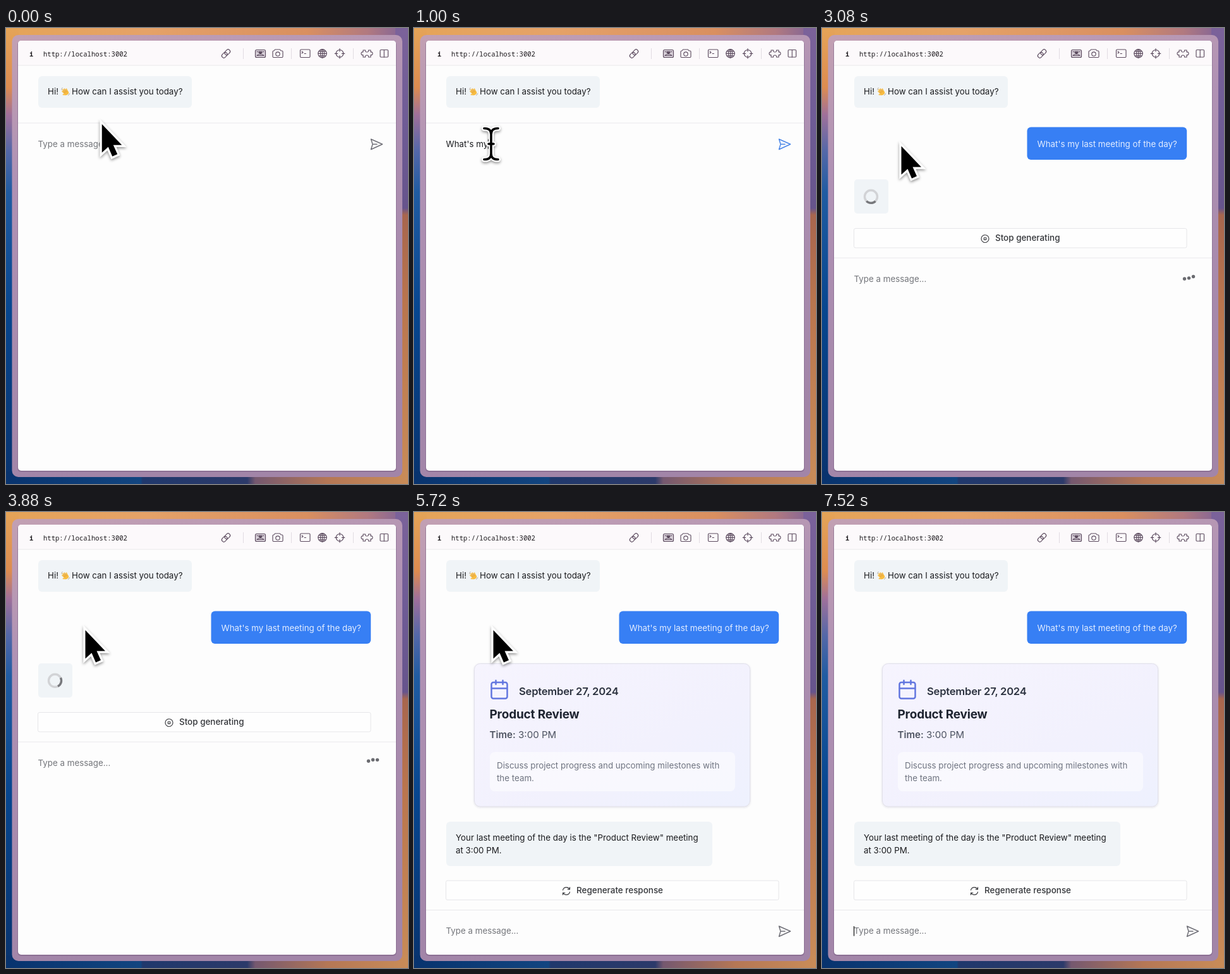
An HTML page that plays this animation: 636x720 px, repeating every 7.56 s.

```html
<!DOCTYPE html>
<html lang="en">
<head>
<meta charset="utf-8">
<title>Chat assistant</title>
<style>
  html, body { margin: 0; width: 100%; height: 100%; overflow: hidden; background: #14427e; }
  svg { display: block; width: 636px; height: 720px; }
  text { font: 400 13.35px Inter, Roboto, sans-serif; fill: #1b1c1f; white-space: pre; }
  .mono { font: 500 10.55px "Noto Sans Mono", "DejaVu Sans Mono", monospace; fill: #1d1a1e; }
  .mid { font-size: 13.45px; font-weight: 500; fill: #333539; }
  .hint { fill: #74767b; }
  .bot { fill: #f0f4f7; }
  .mine { fill: #e3edff; }
  .date { font-size: 16.6px; font-weight: 600; letter-spacing: -.014em; fill: #2d3340; }
  .title { font-size: 19px; font-weight: 700; letter-spacing: -.01em; fill: #1f2530; }
  .time { font-size: 15.1px; fill: #4d5360; }
  .note { fill: #6f7480; }
  .icon { fill: none; stroke: #5d4c60; stroke-width: 1.15; stroke-linecap: round; stroke-linejoin: round; }
  .dark { stroke: #3a3b3f; }
  .rule { stroke: #e9e8eb; }
  .cursor { filter: drop-shadow(0 2px 2px rgba(0,0,0,.42)); }
</style>
</head>
<body>
<svg viewBox="0 0 636 720">
  <defs>
    <linearGradient id="left" x2="0" y2="1">
      <stop offset="0" stop-color="#e5a458"/><stop offset=".13" stop-color="#dd8c50"/>
      <stop offset=".19" stop-color="#a0709a"/><stop offset=".27" stop-color="#5468a8"/>
      <stop offset=".36" stop-color="#205ca2"/><stop offset=".62" stop-color="#07468f"/>
      <stop offset="1" stop-color="#08336e"/>
    </linearGradient>
    <linearGradient id="top">
      <stop offset="0" stop-color="#e5a458"/><stop offset=".35" stop-color="#e5a268"/>
      <stop offset=".75" stop-color="#d98f60"/><stop offset=".9" stop-color="#b17980"/>
      <stop offset="1" stop-color="#7b629a"/>
    </linearGradient>
    <linearGradient id="right" x2="0" y2="1">
      <stop offset="0" stop-color="#7b629a"/><stop offset=".2" stop-color="#6f5c96"/>
      <stop offset=".395" stop-color="#66548c"/><stop offset=".41" stop-color="#a8664e"/>
      <stop offset=".6" stop-color="#b9754e"/><stop offset="1" stop-color="#c98c58"/>
    </linearGradient>
    <linearGradient id="base">
      <stop offset="0" stop-color="#08336e"/><stop offset=".335" stop-color="#124580"/>
      <stop offset=".34" stop-color="#20386c"/><stop offset=".6" stop-color="#2c3a6a"/>
      <stop offset=".62" stop-color="#75586f"/><stop offset=".8" stop-color="#b57755"/>
      <stop offset="1" stop-color="#c98c58"/>
    </linearGradient>
    <linearGradient id="frame" x2=".2" y2="1">
      <stop offset="0" stop-color="#c2a0b3"/><stop offset=".3" stop-color="#b092b4"/>
      <stop offset="1" stop-color="#a285a8"/>
    </linearGradient>
    <linearGradient id="card" x2="1" y2="1">
      <stop offset="0" stop-color="#f6f4fe"/><stop offset=".6" stop-color="#f2f1fd"/>
      <stop offset="1" stop-color="#eef1fe"/>
    </linearGradient>
    <filter id="soft" x="-10%" y="-10%" width="120%" height="120%">
      <feDropShadow dx="0" dy="1" stdDeviation="1.5" flood-color="#40406a" flood-opacity=".16"/>
    </filter>
    <path id="beamShape" d="M-11 -24.5Q0 -25 0 -15Q0 -25 11 -24.5M0 -15V15M-11 24.5Q0 25 0 15Q0 25 11 24.5M-4 0H4"/>
  </defs>

  <!-- desktop and window -->
  <rect width="636" height="720" fill="url(#top)"/>
  <rect width="20" height="720" fill="url(#left)"/>
  <rect x="616" width="20" height="720" fill="url(#right)"/>
  <rect y="700" width="636" height="20" fill="url(#base)"/>
  <rect x="9.5" y="11" width="617.5" height="698" rx="10" fill="url(#frame)"/>
  <rect x="18" y="20" width="600" height="681" rx="6" fill="#7d6388" opacity=".6"/>
  <rect x="19" y="20" width="598" height="679" rx="5" fill="#fdfdfd"/>
  <path d="M19 59V25a5 5 0 0 1 5-5H612a5 5 0 0 1 5 5V59z" fill="#fcf9fb"/>
  <path class="rule" d="M19 59H617"/>

  <!-- toolbar -->
  <text class="mono" x="37" y="44.5" style="font-weight:700">i</text>
  <text class="mono" x="59" y="44.5">http://localhost:3002</text>
  <path d="M375.5 32V49M451.5 32V49M549.5 32V49" stroke="#e2dce2"/>
  <g class="icon">
    <g transform="rotate(-45 348 40.5)">
      <rect x="340" y="37.3" width="9.5" height="6.4" rx="3.2"/>
      <rect x="346.5" y="37.3" width="9.5" height="6.4" rx="3.2"/>
    </g>
    <rect x="394.5" y="34.5" width="16" height="12" rx="2" fill="#d8d0d9"/>
    <path d="M397 37.5h2M406 37.5h2M397 43.5q5.5-5 11 0z"/>
    <path d="M402.5 41l-2.5-2.5q0-2 2.5-1 2.5-1 2.5 1z" fill="#5d4c60"/>
    <path d="M424 36l1.5-2h8l1.5 2h1.5q1.5 0 1.5 1.5v7.5q0 1.5-1.5 1.5h-13q-1.5 0-1.5-1.5v-7.5q0-1.5 1.5-1.5z"/>
    <circle cx="430" cy="41" r="3.2"/>
    <rect x="465.5" y="34" width="15.5" height="12.5" rx="1.5"/>
    <path d="M468 37l2 1.5-2 1.5M472 40.5h2.5"/>
    <circle cx="500.5" cy="40.3" r="6.7"/>
    <ellipse cx="500.5" cy="40.3" rx="3" ry="6.7"/>
    <path d="M493.8 40.3h13.4M500.5 33.6v13.4M495 36.8h11M495 43.8h11"/>
    <circle cx="528" cy="40.3" r="5.8"/>
    <path d="M528 32.5v4.5M528 43.5v4.5M520.2 40.3h4.5M531.3 40.3h4.5"/>
    <path d="M565 35h3.5q-.5 3 2.5 3t2.5-3h3.5v3q3-.5 3 2.3t-3 2.3v3.4h-3.5q.5-3-2.5-3t-2.5 3h-3.5v-3.4q-3 .5-3-2.3t3-2.3z"/>
    <rect x="592" y="34.5" width="12.5" height="11.5" rx="1.2"/>
    <path d="M598.2 34.5v11.5"/>
  </g>

  <!-- greeting -->
  <rect class="bot" x="51" y="76" width="243" height="50" rx="6"/>
  <text x="66" y="105.4">Hi!</text>
  <g transform="translate(94.5 101.5) rotate(-38)" stroke="#f8bd42" stroke-width="1.8" stroke-linecap="round" fill="#f8bd42">
    <rect x="-2.6" y="-1" width="5.6" height="4.6" rx="2"/>
    <path d="M-2.8 0L-3.3 -4.5M-.9 0V-6M1.2 0L1.6 -5.5M3 1L4 -3.5M-2.6 3L-5.4 .5"/>
    <path d="M-1.8 0V-4M.3 0V-4.5M2.2 0V-4" stroke="#d08a30" stroke-width=".6"/>
  </g>
  <path d="M88 98q-.5-2.500 1.500-4M100.500 103q0 2.500-2.500 3.500" fill="none" stroke="#a99d8d" stroke-width=".8"/>
  <text x="104" y="105.4">How can I assist you today?</text>

  <!-- conversation -->
  <g id="question">
    <rect x="324.5" y="156.6" width="252.7" height="51.4" rx="6" fill="#377ff4"/>
    <text class="mine" x="340.5" y="187.5">What's my last meeting of the day?</text>
  </g>
  <g id="loading">
    <rect class="bot" x="51" y="239" width="54" height="54" rx="5"/>
    <g fill="none" stroke-width="3.4">
      <circle cx="77.5" cy="266.3" r="10" stroke="#d2d3d6"/>
      <path id="arc" d="M70.4 273.4A10 10 0 0 0 84.6 273.4" stroke="#77787c"/>
    </g>
  </g>
  <g id="skeleton">
    <rect x="97" y="240" width="439" height="219" rx="8" fill="#f8f8fe" filter="url(#soft)"/>
    <rect x="113" y="363" width="408" height="78" rx="4" fill="#fcfcfe"/>
    <g id="bars" fill="#d9e2fa">
      <circle cx="126.5" cy="270" r="16"/>
      <rect x="158" y="263" width="135" height="15" rx="3"/>
      <rect x="111" y="302" width="304" height="23" rx="3"/>
      <rect x="111" y="337" width="203" height="15" rx="3"/>
    </g>
  </g>
  <g id="meeting">
    <rect x="95.5" y="239.5" width="436" height="225.5" rx="9" fill="url(#card)" stroke="#e1e0ea" filter="url(#soft)"/>
    <g fill="none" stroke="#6276df" stroke-width="2.5" stroke-linecap="round">
      <rect x="122.5" y="269" width="25" height="25.5" rx="3"/>
      <path d="M123 278.5h24M129.5 266v6M140.5 266v6"/>
    </g>
    <text class="date" x="166" y="289">September 27, 2024</text>
    <text class="title" x="119.5" y="325.5">Product Review</text>
    <text class="time" x="119.5" y="357"><tspan font-weight="600">Time:</tspan> 3:00 PM</text>
    <rect x="120" y="379" width="388" height="62" rx="8" fill="#fff" opacity=".55"/>
    <text class="note" x="131" y="405">Discuss project progress and upcoming milestones with</text>
    <text class="note" x="131" y="424.7">the team.</text>
  </g>
  <g id="answer">
    <rect id="bubble" class="bot" x="51" y="489" rx="6"/>
    <text id="line1" x="66" y="519.2"></text>
    <text id="line2" x="66" y="538.8"></text>
  </g>

  <!-- footer, measured from its rule -->
  <g id="footer">
    <path class="rule" d="M19 0H617"/>
    <rect id="button" x="50.5" y="-46.5" width="526.5" height="30.5" rx="2.5" fill="#fefefe" stroke="#e6e6e9"/>
    <g id="stop">
      <g class="icon dark">
        <circle cx="258" cy="-30.3" r="6"/>
        <rect x="256.3" y="-32" width="3.4" height="3.4" rx=".5"/>
      </g>
      <text class="mid" x="274" y="-26.6">Stop generating</text>
    </g>
    <g id="again">
      <path class="icon dark" d="M235.5 -31.5a5.7 5.7 0 0 1 10.5-1.5M246.5 -36v3.3h-3.3M246.5 -28.5a5.7 5.7 0 0 1-10.5 1.5M235.5 -24v-3.3h3.3"/>
      <text class="mid" x="257" y="-26.6">Regenerate response</text>
    </g>
    <text id="hint" class="hint" x="50.5" y="37.7">Type a message...</text>
    <text id="typed" x="50.5" y="37.7"></text>
    <rect id="caret" y="25.5" width="1.2" height="15.5" fill="#111"/>
    <path id="send" d="M577.5 25.5L595.5 33.5L577.5 41.8L580 33.5zM580 33.5H587" fill="none" stroke-width="1.5" stroke-linejoin="round" stroke-linecap="round"/>
    <g id="dots" fill="#6a6b70">
      <circle cx="573.5" r="2.7"/><circle cx="580.5" r="2.7"/><circle cx="587.5" r="2.7"/>
    </g>
  </g>

  <!-- mouse -->
  <g id="arrow" class="cursor">
    <path d="M0 0V45L10 36L16.5 51L24.5 47.5L18 33H31.5z" transform="translate(1.5 4)" stroke="#fff" stroke-width="6.5" paint-order="stroke" stroke-miterlimit="3"/>
  </g>
  <g id="beam" class="cursor" fill="none" stroke-linecap="round">
    <use href="#beamShape" stroke="#fff" stroke-width="8"/>
    <use href="#beamShape" stroke="#000" stroke-width="3.6"/>
  </g>
</svg>
<script>
  const LOOP = 7560;
  const PROMPT = "What's my last meeting of the day?";
  const REPLY = ['Your last meeting of the day is the "Product Review" meeting', 'at 3:00 PM.'];
  const AT = {
    hover: 60, type: 590, sent: 2440, skeleton: 4200, card: 5040,
    reply: 5120, done: 5560, refocus: 5940, leave: 6600
  };
  const KEY = 43;

  const el = {};
  document.querySelectorAll('svg [id]').forEach(n => el[n.id] = n);
  const show = (n, on) => n.setAttribute('display', on ? 'inline' : 'none');
  const move = (n, x, y) => n.setAttribute('transform', `translate(${x} ${y})`);
  const clamp = (v, a, b) => Math.min(b, Math.max(a, v));
  const label = (n, s) => { if (n.textContent !== s) n.textContent = s; };

  // Streams the reply and returns the footer position below it.
  function drawReply(t) {
    const [first, second] = REPLY;
    const total = first.length + second.length;
    const n = Math.round(total * clamp((t - AT.reply) / 360, 0.05, 1));
    const rest = second.slice(0, Math.max(0, n - first.length));
    label(el.line1, first.slice(0, n));
    label(el.line2, rest);
    const height = rest ? 70 : 50;
    const width = n < first.length ? el.line1.getComputedTextLength() + 31 : 421;
    el.bubble.setAttribute('width', width);
    el.bubble.setAttribute('height', height);
    return 489 + height + 69.5;
  }

  function drawInput(t, busy) {
    const count = t < AT.sent ? clamp(Math.floor((t - AT.type) / KEY), 0, PROMPT.length) : 0;
    const typing = count > 0;
    label(el.typed, PROMPT.slice(0, count));
    show(el.hint, !typing);
    const focused = t > 300 && t < AT.type;
    const blink = t >= AT.refocus && (t - AT.refocus) % 1060 < 530;
    show(el.caret, typing || focused || blink);
    el.caret.setAttribute('x', 50 + (typing ? el.typed.getComputedTextLength() + 0.5 : 0));
    show(el.send, !busy);
    el.send.setAttribute('stroke', typing ? '#4a86e8' : '#707078');
    show(el.dots, busy);
    [...el.dots.children].forEach((dot, i) => {
      const phase = 2 * Math.PI * (t - 4720) / 1093 - i;
      dot.setAttribute('cy', 30.5 - 2.5 * Math.cos(phase));
    });
  }

  function drawMouse(t) {
    const p = 1 - (1 - clamp(t / 300, 0, 1)) ** 3;
    const x = 150.5 - 26.5 * p, y = 147.5 + 35 * p;
    const overInput = t >= AT.hover && t < AT.sent;
    show(el.arrow, !overInput && t < AT.leave);
    show(el.beam, overInput);
    move(el.arrow, x, y);
    move(el.beam, x - 2, y + 0.5);
  }

  function render(t) {
    const sent = t >= AT.sent, done = t >= AT.done;
    const busy = sent && !done;
    show(el.question, sent);
    show(el.loading, sent && t < AT.skeleton);
    show(el.skeleton, t >= AT.skeleton && t < AT.card);
    show(el.meeting, t >= AT.card);
    show(el.answer, t >= AT.reply);
    show(el.button, sent);
    show(el.stop, busy);
    show(el.again, done);

    el.arc.setAttribute('transform', `rotate(${(t - 3080) * 0.36} 77.5 266.3)`);
    el.bars.setAttribute('opacity', 0.9 + 0.1 * Math.cos(Math.PI * (t - AT.skeleton) / 1000));

    let y = 150;
    if (t >= AT.reply) y = drawReply(t);
    else if (t >= AT.skeleton) y = 543;
    else if (sent) y = 363;
    move(el.footer, 0, y);

    drawInput(t, busy);
    drawMouse(t);
  }

  const start = performance.now();
  function tick() {
    render((performance.now() - start) % LOOP);
    requestAnimationFrame(tick);
  }
  tick();
</script>
</body>
</html>
```
